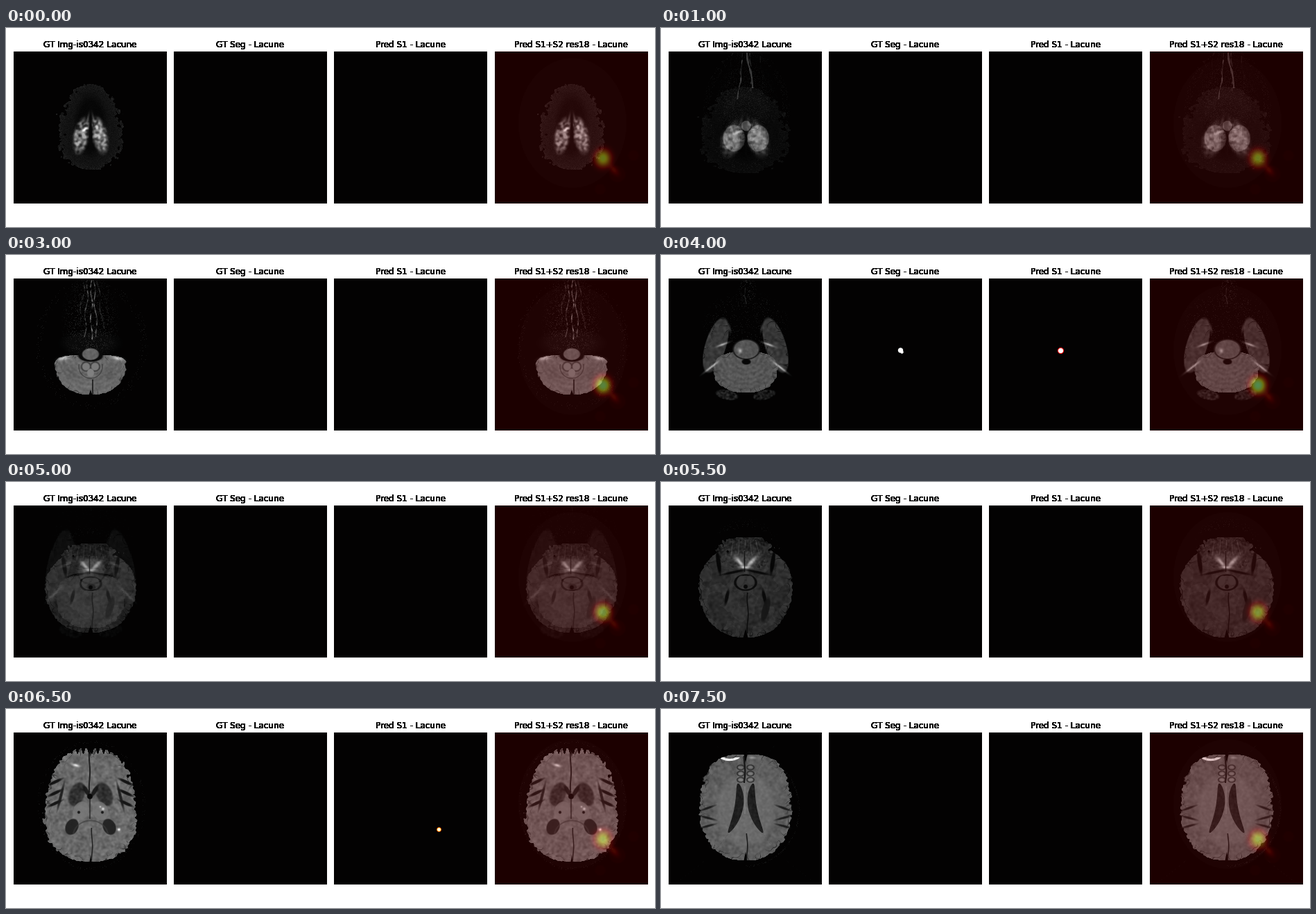
A matplotlib script for the animation above (8000 ms loop, 936 by 288 pixels).

```python
import numpy as np
import matplotlib.pyplot as plt
from matplotlib.animation import FuncAnimation

W, H = 936, 288
PAD, SIDE, N = 10.8, 220.5, 221
TITLES = ("GT Img-is0342 Lacune", "GT Seg - Lacune",
          "Pred S1 - Lacune", "Pred S1+S2 res18 - Lacune")
COUNT, STEP = 16, 500
MID = 122
BLACK = np.array([3, 2, 2]) / 255

# Shapes use stage coordinates of the first panel; U folds left onto right.
X, Y = np.meshgrid(np.arange(N) + 11.5, np.arange(N) + 34.0)
U = np.abs(X - MID)
rng = np.random.default_rng(42)


def blur(a, n=1):
    for _ in range(n):
        for ax in (0, 1):
            a = (np.roll(a, 1, ax) + 2 * a + np.roll(a, -1, ax)) / 4
    return a


def noise(n):
    a = blur(rng.normal(size=X.shape), n)
    return a / a.std()


def radius(cx, cy, rx, ry, rot=0, x=X):
    t = np.radians(rot)
    u = (x - cx) * np.cos(t) + (Y - cy) * np.sin(t)
    v = (Y - cy) * np.cos(t) - (x - cx) * np.sin(t)
    return np.hypot(u / rx, v / ry)


def ell(cx, cy, rx, ry, rot=0, x=X, soft=1.5):
    r = radius(cx, cy, rx, ry, rot, x)
    return np.clip((1 - r) * min(rx, ry) / soft + 0.5, 0, 1)


def glow(cx, cy, rx, ry, rot=0, x=X):
    return np.exp(-radius(cx, cy, rx, ry, rot, x) ** 2)


def ring(cx, cy, rx, ry, width, x=X):
    gap = np.abs(radius(cx, cy, rx, ry, 0, x) - 1) * min(rx, ry)
    return np.clip(width - gap + 0.3, 0, 1)


def pair(draw, dx, *args, **kw):
    return draw(dx, *args, x=U, **kw)


def strand(x0, y0, y1, slope=0, sway=0, width=1.0):
    gap = np.abs(X - x0 - slope * (Y - y0) - sway * np.sin(Y / 7 + x0))
    return np.clip(width - gap + 0.3, 0, 1) * (Y > y0) * (Y < y1)


def egg(cy, rx, up, down, square=2.2, taper=0.0, cleft=0.0, rough=0.7):
    """Symmetric outline: boxier above cy, round below, notched at the end."""
    v = (Y - cy) / np.where(Y < cy, up, down)
    p = np.where(Y < cy, square, 2.2)
    half = rx * np.clip(1 - np.abs(v) ** p, 0, 1) ** (1 / p)
    half *= 1 + taper * np.minimum(v, 0)
    half += np.where(half > 0, rough * noise(4), -1)
    notch = cleft * np.clip(np.abs(v) - 0.8, 0, 1) * 5
    return np.clip(half - U + 0.5, 0, 1) * np.clip(U - notch + 1, 0, 1)


def put(a, mask, value, alpha=1.0):
    a += mask * alpha * (value - a)


def specks(mask, density, level):
    hit = rng.random(X.shape) < density
    return mask * hit * level * rng.uniform(0.3, 1, X.shape)


def strands(count, spread, bottom, level):
    a = np.zeros_like(X)
    for t in np.linspace(-1, 1, count):
        x0 = MID + spread * t + rng.uniform(-2, 2)
        s = strand(x0, 36, bottom - 25 * abs(t), 0.12 * t, 1.5)
        a += s * level * (1 - 0.6 * abs(t)) * np.clip(0.7 + 0.5 * noise(3), 0, 1.5)
    return a


def folds(a, mask, dark, width=0.13, reach=60):
    """Winding furrows: zero lines of smooth noise, strongest at the rim."""
    rim = np.clip(mask * (1 - blur(mask, reach)) * 3.5, 0, 1)
    put(a, rim * np.exp(-(noise(26) / width) ** 2), dark, 0.85)


def folia(cy, pitch=0.9):
    return np.sin(pitch * np.hypot(X - MID, Y - cy) + 0.5 * noise(8))


def cap():
    a = np.zeros_like(X)
    head = egg(155, 45, 74, 51, taper=0.12, rough=3)
    a += head * (13 + 9 * rng.random(X.shape))
    a += specks(head * (1 - blur(head, 90)), 0.6, 34)
    a *= 1 - 0.6 * ell(MID, 142, 22, 42, soft=8)
    lobes = pair(ell, 13, 156, 10, 24, -12, soft=5)
    a += blur(lobes, 2) * 95 * np.clip(1 + 0.4 * noise(4), 0.3, 1.7)
    a += 110 * glow(110, 149, 10, 2.2, -28) + 60 * glow(136, 150, 6, 12, -20)
    a += 50 * pair(glow, 4, 132, 1.6, 8, -12)
    put(a, ell(MID, 156, 2.2, 24), 8)
    return a


def low():
    a = specks(ell(123, 124, 79, 88) * (1 - ell(123, 124, 66, 76)), 0.12, 32)
    a += specks(ell(MID, 112, 52, 58, soft=25), 0.25, 34)
    a += 14 * ell(MID, 125, 38, 28, soft=12)
    a += strands(4, 24, 105, 60)
    a += 95 * strand(116, 50, 108, -0.16, 1) + 110 * strand(123, 38, 92, 0.22, 1, 1.7)
    lobes = pair(ell, 22, 165, 20, 19, soft=2)
    put(a, lobes, 128 + 14 * folia(140) + 9 * noise(2))
    a -= 40 * lobes * glow(MID, 172, 13, 16)
    folds(a, lobes, 45, 0.16)
    put(a, strand(122.5, 158, 190, 0, 0.5, 1.6), 5)
    put(a, ell(MID, 147, 10, 9), 8)
    put(a, ell(MID, 147, 8.5, 7.5), 130 + 6 * noise(3))
    put(a, ell(128, 163, 3.5, 5), 145)
    return a


def cerebellum():
    a = specks(ell(123, 130, 82, 94) * (1 - ell(123, 130, 70, 84)), 0.05, 26)
    a += specks(ell(MID, 95, 36, 58, soft=20), 0.18, 34)
    a += 10 * ell(MID, 128, 42, 18, soft=10)
    a += strands(5, 9, 132, 80)
    body = egg(158, 51, 13, 45, square=3, cleft=3)
    put(a, body, 106 + 5 * folia(138, 0.85) + 4 * noise(2))
    folds(a, body, 60)
    a -= 14 * body * pair(glow, 28, 170, 14, 9, -30)
    put(a, ell(MID, 146, 18, 9), 10)
    put(a, ell(MID, 144, 12, 8.5), 100 + 4 * noise(2))
    put(a, pair(ell, 6.5, 162, 7.5, 7.5), 35, 0.6)
    put(a, pair(ell, 6.5, 162, 5.5, 5.5), 122)
    put(a, ell(MID, 171, 5, 6), 128)
    put(a, ring(MID, 162, 17, 17, 0.9) * (Y > 158), 45, 0.6)
    put(a, strand(125, 180, 203), 15, 0.9)
    return a + 95 * pair(glow, 39, 150, 8, 2.5, 12)


def pons():
    a = specks(ell(125, 52, 12, 18, soft=5), 0.12, 42)
    a += specks(ell(123, 100, 60, 45, soft=12), 0.09, 22)
    a += strands(3, 5, 72, 24)
    wings = pair(ell, 43, 131, 15, 41, -17)
    put(a, wings, 56 + 5 * noise(4))
    folds(a, wings, 20, 0.15)
    body = egg(166, 46, 26, 34, square=2.6)
    put(a, body, 86 + 5 * folia(140) + 4 * noise(2))
    folds(a, body, 50)
    put(a, ell(123, 137, 20, 15), 24)
    put(a, ell(123, 137, 18, 13.5), 84 + 4 * noise(2))
    put(a, ell(123, 155, 6.5, 4), 6)
    put(a, pair(ell, 27, 203, 16, 7, -12), 30 + 9 * noise(2))
    a += 110 * pair(glow, 33, 130, 9, 1.6, 20)
    a += 120 * pair(glow, 50, 163, 12, 1.6, 38)
    a += 50 * pair(glow, 23, 107, 1.6, 6, 10)
    return a + 95 * glow(114, 139, 2.8, 3.2)


def midbrain():
    a = specks(ell(123, 92, 44, 38, soft=12), 0.08, 20)
    body = egg(152, 67, 60, 74, cleft=4)
    put(a, body, 46 + 4 * noise(4) + 4 * np.sign(noise(40)))
    put(a, ell(MID, 88, 44, 20), 0)
    front = egg(104, 37, 24, 22, square=3, rough=5)
    put(a, front, 37 + 7 * noise(2))
    folds(a, np.maximum(body, front), 12, 0.16)
    for t in np.linspace(-2, 2, 5):
        a += 24 * strand(121 + 8 * t, 84, 107, 0.1 * t, 0.5, 0.7)
    put(a, pair(ell, 39, 117, 3, 17, 8), 4, 0.95)
    put(a, pair(ell, 17, 131, 18, 1.8, 12), 6, 0.9)
    put(a, ring(MID, 146, 15, 11, 1.4), 6, 0.85)
    put(a, pair(ell, 27, 167, 2.5, 11, -12), 6, 0.9)
    put(a, pair(ell, 7, 143, 5, 7, -20), 56)
    put(a, ell(MID, 152, 3, 3), 8)
    put(a, ell(151, 185, 5, 18, 15), 20, 0.85)
    put(a, strand(125, 160, 220, 0, 0.8), 8, 0.85)
    a += 130 * pair(glow, 8, 117, 2.8, 10, 42)
    a += 110 * glow(121, 124, 9, 1.8) + 35 * glow(121, 112, 22, 10)
    put(a, strand(120.5, 100, 131), 10, 0.8)
    return a


def thalamus():
    a = specks(ring(123, 140, 76, 92, 2), 0.1, 24)
    body = egg(156, 67, 99, 66, square=3, taper=0.18, cleft=2, rough=1.5)
    body *= np.clip(Y - 60 - 5 * np.sin(U * 0.75), 0, 1)
    put(a, body, 106 + 6 * noise(3) + 5 * noise(8))
    folds(a, body, 45)
    for y in (106, 122, 137):
        put(a, pair(ell, 51, y, 11, 2.2, 25), 12, 0.9)
    put(a, pair(ell, 43, 127, 2, 19, -14), 25, 0.9)
    put(a, blur(pair(ell, 20, 124, 11, 18, -22), 2), 48 + 6 * noise(3))
    put(a, pair(ell, 6, 119, 3, 9, 30), 20, 0.9)
    put(a, pair(ell, 14, 148, 11, 14, -25), 122, 0.75)
    put(a, pair(ell, 27, 171, 9, 12, -25), 30, 0.92)
    put(a, ring(MID, 184, 25, 22, 1.2) * (Y < 182), 60, 0.6)
    put(a, ell(121, 127, 4, 4), 8)
    put(a, strand(120.5, 60, 122, 0, 0.6, 1.2), 18, 0.85)
    put(a, strand(121, 130, 160), 30, 0.8)
    put(a, strand(124, 172, 220, 0, 0.7), 20, 0.85)
    put(a, pair(ell, 17, 150, 2, 2), 25)
    a += 100 * glow(140, 145, 2, 2) + 80 * glow(136, 142, 1.4, 1.4)
    return a + 150 * glow(163, 175, 2, 2) + 130 * glow(101, 82, 5, 2, 15)


def ventricles():
    a = specks(ring(123, 146, 76, 82, 1.5) * (X > MID), 0.25, 22)
    body = egg(143, 66, 77, 77, square=3, taper=0.08, cleft=3, rough=1.2)
    put(a, body, 94 + 4 * noise(3) + 4 * noise(8))
    put(a, blur(ell(MID, 146, 41, 52, soft=8), 2), 110 + 4 * noise(3), 0.8)
    folds(a, body, 38)
    center = 8.5 + 0.006 * (Y - 128) ** 2
    half = 6.5 * np.sqrt(np.clip(1 - ((Y - 144) / 36) ** 2, 0, 1))
    put(a, np.clip(half - np.abs(U - center) + 0.3, 0, 1), 31 + 3 * noise(2))
    put(a, strand(121, 112, 153), 125)
    put(a, strand(120.5, 68, 108, 0, 0.8, 1.3), 14, 0.9)
    for y in (85, 94, 103):
        put(a, pair(ring, 7, y, 5, 3.5, 0.9), 30, 0.7)
        a += 25 * pair(ell, 7, y, 3, 1.5)
    put(a, strand(124, 180, 220, 0, 0.8), 18, 0.9)
    for y, tilt in ((144, 20), (158, -15), (170, 15)):
        put(a, pair(ell, 55, y, 11, 1.6, tilt), 15, 0.8)
    a += 150 * ring(99, 66, 14, 8, 1.8) * (Y > 70) * body
    return a + 50 * glow(132, 71, 5, 2)


# Slice position, painter, bounds of the main mass (x0, x1, y0, y1).
KEYS = ((0, cap, (100, 148, 130, 178)),
        (4, low, (81, 165, 139, 188)),
        (6, cerebellum, (72, 176, 135, 202)),
        (8, pons, (62, 184, 105, 205)),
        (11, midbrain, (56, 190, 78, 226)),
        (13, thalamus, (54, 189, 55, 222)),
        (15, ventricles, (55, 187, 66, 219)))
SLICES = [np.clip(draw(), 0, 255) for _, draw, _ in KEYS]


def warp(img, src, dst):
    def axis(v, s0, s1, d0, d1):
        q = np.rint((v - d0) / (d1 - d0) * (s1 - s0) + s0 - v[0]).astype(int)
        return np.clip(q, 0, N - 1), (q >= 0) & (q < N)
    cols, in_x = axis(X[0], *src[:2], *dst[:2])
    rows, in_y = axis(Y[:, 0], *src[2:], *dst[2:])
    return img[np.ix_(rows, cols)] * np.outer(in_y, in_x)


def scan(i):
    k = max(n for n, key in enumerate(KEYS) if key[0] <= i)
    if KEYS[k][0] == i:
        return SLICES[k]
    (p, _, box0), (q, _, box1) = KEYS[k:k + 2]
    w = (i - p) / (q - p)
    box = (1 - w) * np.array(box0) + w * np.array(box1)
    m = w * w * (3 - 2 * w)
    return (1 - m) * warp(SLICES[k], box0, box) + m * warp(SLICES[k + 1], box1, box)


def overlay(gray, i):
    peak = 0.38 + 0.12 * np.exp(-((i - 7.5) / 2.5) ** 2)
    heat = peak * np.exp(-radius(167, 189, 12, 13) ** 2.4)
    heat += 0.1 * glow(183, 206, 9, 5, 50)
    for cx, cy, r in ((211, 185, 8), (163, 234, 8), (188, 212, 12)):
        heat += 0.015 * ell(cx, cy, r, r, soft=3)
    alpha = (0.22 + 0.45 * heat)[..., None]
    color = plt.get_cmap("jet_r")(np.clip(heat, 0, 1))[..., :3]
    haze = 0.012 * ell(123, 138, 78, 94) + 0.35 * heat ** 2
    return (1 - alpha) * gray[..., None] / 255 + alpha * color + haze[..., None]


def spot(cx, cy, *radii):
    return np.stack([ell(cx, cy, r, r, soft=1) for r in radii], -1)


def paint(i):
    gray = scan(i)
    rgb = np.repeat(gray[..., None] / 255, 3, 2)
    seg, pred = np.zeros_like(rgb), np.zeros_like(rgb)
    if i == 8:
        seg = np.maximum(spot(114.5, 138.5, 3.7, 3.7, 3.7),
                         spot(116.5, 141, 2.2, 2.2, 2.2))
        pred = spot(114.5, 139, 4.6, 3.6, 3.6)
    if i == 13:
        pred = spot(162.5, 175, 3.4, 2.9, 2.2)
    panels = [np.maximum(p, BLACK) for p in (rgb, seg, pred)]
    return [np.clip(p, 0, 1) for p in panels + [overlay(gray, i)]]


FRAMES = [paint(i) for i in range(COUNT)]

fig = plt.figure(figsize=(W / 72, H / 72), dpi=72, facecolor="white")
views = []
for k, title in enumerate(TITLES):
    left = PAD + k * (SIDE + PAD)
    ax = fig.add_axes([left / W, 0.5 - SIDE / 2 / H, SIDE / W, SIDE / H])
    ax.axis("off")
    views.append(ax.imshow(FRAMES[0][k], interpolation="nearest", aspect="auto"))
    for _ in range(20):  # stacked text gives heavier edges
        fig.text((left + SIDE / 2) / W, 0.5 + (SIDE / 2 + 6) / H, title,
                 size=12, family="DejaVu Sans", ha="center", va="baseline")


def update(i):
    for view, img in zip(views, FRAMES[i]):
        view.set_data(img)
    return views


anim = FuncAnimation(fig, update, frames=COUNT, interval=STEP, repeat=True,
                     repeat_delay=0, blit=False)
plt.show()
```
